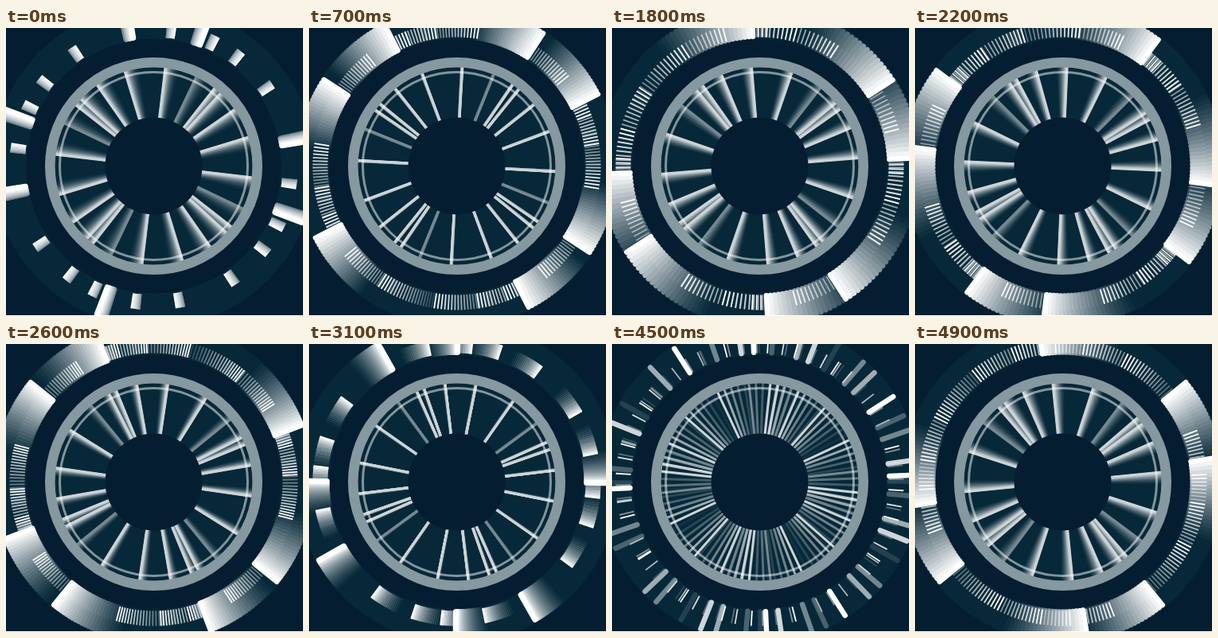
Recreate the animation shown at these times as an HTML page with a canvas. Size 373 by 362 pixels, loop 5000 ms.

```html
<!DOCTYPE html>
<html>
<head>
<meta charset="utf-8">
<style>
html, body { margin: 0; width: 100%; height: 100%; overflow: hidden; background: #fff; }
canvas { display: block; }
</style>
</head>
<body>
<canvas id="c" width="373" height="361"></canvas>
<script>
const g = document.getElementById('c').getContext('2d');
const LOOP = 5, STEP = 0.1, TRAIL = 1 / 3;
const SPIN_FROM = 3.2, SPIN_TO = 4.55;
const DARK = '#051d30', TEAL = '#062838', STEEL = '#8698a0', GLASS = 'rgba(255,255,255,.5)';

// Degrees clockwise from the top, repeated in every quarter turn.
const BARS = [21, 81], GAP = 171;
const TICKS = [9, 27, 39, 57, 81];
const SPOKES = [73, 96.7, 115.5, 128, 132.5, 145], DIM = 115.5;

const spinning = t => t > SPIN_FROM && t < SPIN_TO;

// Each ring drifts forward, whirls back fast, then slows down.
function outerAngle(t) {
  if (t <= SPIN_FROM) return t * (27.8 + 54.5 * t - 12.1 * t * t);
  return spinning(t) ? -367 * (t - 3.7) : 150 - 90 * (t - 4.9);
}

function innerAngle(t) {
  if (t <= SPIN_FROM) return t * (-16.8 + 19.8 * t - 3.69 * t * t);
  return spinning(t) ? 17 - 61 * (t - 3.7) : 11.2 - 20 * (t - 4.9);
}

// Teal at 0, white at 1.
const tint = k => `rgb(${[6, 40, 56].map(v => Math.round(v + (255 - v) * k))})`;

function ray(deg, r0, r1, width, light, cap = 'butt') {
  const a = deg * Math.PI / 180, s = Math.sin(a), c = -Math.cos(a);
  g.strokeStyle = tint(light);
  g.lineWidth = width;
  g.lineCap = cap;
  g.beginPath();
  g.moveTo(s * r0, c * r0);
  g.lineTo(s * r1, c * r1);
  g.stroke();
}

function disc(r, color) {
  g.fillStyle = color;
  g.beginPath();
  g.arc(0, 0, r, 0, 7);
  g.fill();
}

function ring(r, width, color) {
  g.strokeStyle = color;
  g.lineWidth = width;
  g.beginPath();
  g.arc(0, 0, r, 0, 7);
  g.stroke();
}

function draw(t) {
  g.setTransform(1, 0, 0, 1, 0, 0);
  g.fillStyle = DARK;
  g.fillRect(0, 0, 373, 361);
  g.translate(185.5, 173.5);
  disc(203, TEAL);
  disc(160, DARK);
  disc(125, TEAL);

  // Oldest echo first; the whirl leaves only a few.
  const echoes = spinning(t) ? 5 : 20;
  for (let i = echoes; i >= 0; i--) {
    const past = t - i / echoes * TRAIL, fade = 1 - i / (echoes + 1);
    const outer = outerAngle(past), inner = innerAngle(past);
    for (let q = 0; q < 360; q += 90) {
      for (const b of BARS) if (q + b !== GAP) ray(q + b + outer, 163, 199, 6.5, fade ** 1.2, 'round');
      for (const k of TICKS) ray(q + k + outer, 162, 181, 1.8, fade);
      for (const s of SPOKES) ray(q + s + inner, 60, 125, 3, fade ** 1.6 * (s === DIM ? 0.45 : 0.8));
    }
  }

  disc(61, DARK);
  ring(118, 3, GLASS);
  ring(130.2, 12.6, STEEL);
}

const start = performance.now();
function frame() {
  const t = (performance.now() - start) / 1000 % LOOP;
  draw(Math.floor(t / STEP + 1e-6) * STEP);
  requestAnimationFrame(frame);
}
frame();
</script>
</body>
</html>
```
